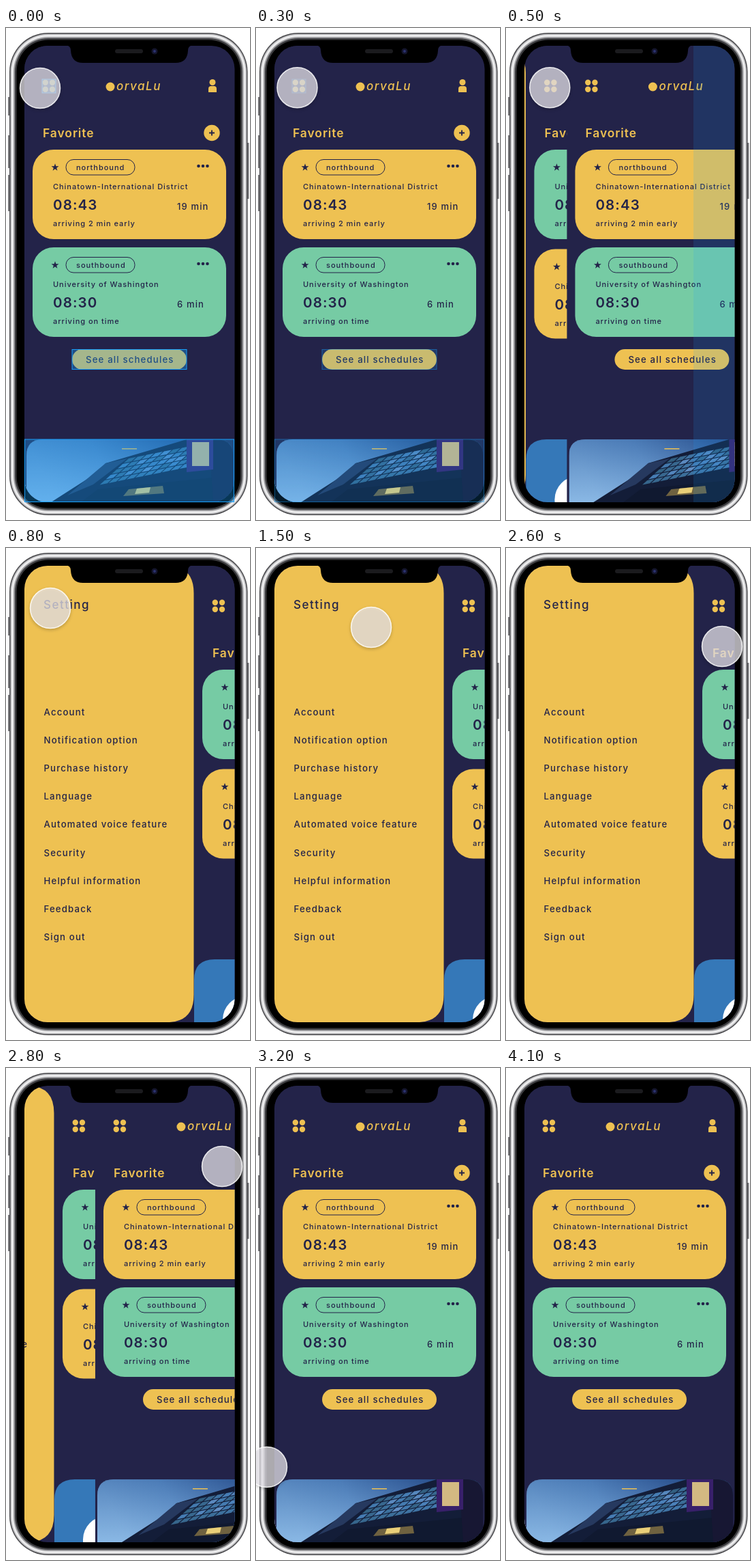
An HTML page that plays this animation: 358 by 720 pixels, repeating every 4.2 s.

```html
<!DOCTYPE html>
<html lang="en">
<head>
<meta charset="utf-8">
<style>
  html, body { margin: 0; width: 100%; height: 100%; overflow: hidden; background: #fff; }
  svg { display: block; width: 358px; height: 720px; }
  text { font-family: Inter, "Open Sans", sans-serif; font-weight: 500; letter-spacing: .088em; fill: #232349; }
  .gold { fill: #eec152; }
  .bold { font-weight: 600; letter-spacing: .055em; }
  .navy { fill: #232349; }
  .hint { fill: #18a0fb; fill-opacity: .34; stroke: #18a0fb; }
  #cursor { filter: drop-shadow(0 2px 2px rgba(0, 0, 0, .25)); }
</style>
</head>
<body>
<svg viewBox="0 0 358 720">
  <defs>
    <linearGradient id="sky" x2="1" y2="-.15">
      <stop offset="0" stop-color="#78aadd"/><stop offset=".3" stop-color="#6497d0"/><stop offset=".75" stop-color="#2c4f8c"/>
    </linearGradient>
    <linearGradient id="dusk" x2="0" y2="1">
      <stop offset="0" stop-color="#24508f" stop-opacity=".4"/><stop offset="1" stop-color="#a5cdf0" stop-opacity=".4"/>
    </linearGradient>
    <clipPath id="screen"><rect x="27" y="26" width="308.5" height="668" rx="34"/></clipPath>
    <clipPath id="photo"><path d="M30 694V626Q30 602 54 602H309Q333 602 333 626V694Z"/></clipPath>
  </defs>

  <path d="M4.500 101V128M4.500 157V205M4.500 215V268M355 168V250" stroke="#77777a" stroke-width="3"/>
  <g id="phone"></g>
  <g clip-path="url(#screen)">
    <g id="settings"></g>
    <g id="home"></g>
  </g>
  <path d="M88 25H274Q267 26 267 33Q266 51 249 51H113Q96 51 95 33Q95 26 88 25Z"/>
  <rect x="160" y="31" width="41" height="6" rx="3" fill="#1b1b1e"/>
  <circle cx="218" cy="34" r="4.500" fill="#14152c"/>
  <circle cx="218" cy="34" r="2" fill="#2b3270"/>
  <g id="hints">
    <rect class="hint" x="53" y="75" width="20" height="20"/>
    <rect class="hint" x="97" y="470.500" width="168" height="29"/>
    <rect class="hint" x="27.500" y="602" width="307" height="91.500"/>
  </g>
  <rect id="closeHint" class="hint" x="275" y="26" width="60" height="668" stroke-width="0" clip-path="url(#screen)"/>
  <circle id="cursor" r="29.500" fill="#eceaf0" fill-opacity=".73" stroke="#fff" stroke-opacity=".85" stroke-width="1.500"/>
</svg>

<script>
const el = id => document.getElementById(id);
const label = (x, y, size, str, cls = '') =>
  `<text x="${x}" y="${y}" font-size="${size}" class="${cls}">${str}</text>`;
const dots = (points, r, cls) =>
  points.map(([x, y]) => `<circle cx="${x}" cy="${y}" r="${r}" class="${cls}"/>`).join('');

// Metal rim, from the outside in
const rim = [[0, '#4a4a4d'], [1.5, '#b9b9bc'], [3, '#ededee'], [6, '#99999c'], [8, '#3c3c3f'], [10.5, '#000']];
el('phone').innerHTML = rim.map(([d, fill]) =>
  `<rect x="${5 + d}" y="${7 + d}" width="${349.5 - 2 * d}" height="${706 - 2 * d}" rx="${57 - d}" fill="${fill}"/>`).join('');

const star = Array.from({ length: 10 }, (_, i) => {
  const r = i % 2 ? 2.3 : 5.8, a = i * Math.PI / 5;
  return `${72 + r * Math.sin(a)},${204 - r * Math.cos(a)}`;
}).join(' ');

const north = { fill: '#eec152', way: 'northbound', stop: 'Chinatown-International District',
  time: '08:43', wait: '19 min', note: 'arriving 2 min early' };
const south = { fill: '#76cba4', way: 'southbound', stop: 'University of Washington',
  time: '08:30', wait: '6 min', note: 'arriving on time' };

const card = (c, dy) => `<g transform="translate(0 ${dy})">
  <rect x="39" y="178" width="284" height="131" rx="31" fill="${c.fill}"/>
  <polygon points="${star}" class="navy"/>
  <rect x="88" y="192.500" width="101" height="22.500" rx="11" fill="none" stroke="#232349"/>
  ${dots([[282.5, 202], [289, 202], [295.5, 202]], 2.3, 'navy')}
  ${label(103, 208, 11, c.way)}${label(69, 236, 11, c.stop)}
  ${label(69, 266, 20.5, c.time, 'bold')}${label(251, 265.5, 13, c.wait)}
  ${label(69, 290, 11, c.note)}</g>`;

const header = `<rect x="27" y="26" width="309" height="668" class="navy"/>
  ${dots([[57.8, 79.7], [68, 79.7], [57.8, 89.7], [68, 89.7]], 4.2, 'gold')}
  ${label(54, 160, 17.4, 'Favorite', 'gold bold')}`;

// Lit office windows on a skewed grid
function windows() {
  let out = '';
  for (let row = 0; row < 5; row++)
    for (let col = 0; col < 13; col++) {
      const tone = (row * 37 + col * 53 + row * col * 11) % 24;
      out += `<rect x="${col * 13}" y="${row * 8}" width="11" height="6.5" fill="hsl(${205 + tone / 3} 44% ${34 + tone}%)"/>`;
    }
  return `<g transform="matrix(1 -.2 -1.1 1 180 630)">${out}</g>`;
}

const photo = `<g clip-path="url(#photo)">
  <rect x="30" y="602" width="303" height="92" fill="url(#sky)"/>
  <rect x="30" y="602" width="303" height="92" fill="url(#dusk)"/>
  <path d="M66 694L138 648L146 637L265 602H333V694Z" fill="#131d38"/>
  <path d="M146 637L178 630L128 668L90 684Z" fill="#26395f"/>
  ${windows()}
  <path d="M110 694L135 675L333 655V694Z" fill="#101930"/>
  <path d="M180 675L230 670L232 681L172 685Z" fill="#6f6240"/>
  <path d="M192 674L212 672L210 680L189 682Z" fill="#e9cf78"/>
  <path d="M298 602H333V694H304Z" fill="#171733"/>
  <path d="M265 602H304V646L265 650Z" fill="#38206a"/>
  <rect x="273" y="606" width="25" height="35" fill="#d3b982"/>
  <rect x="170" y="615" width="22" height="1.5" class="gold"/></g>`;

el('home').innerHTML = `${header}
  <circle cx="153" cy="86" r="6.5" class="gold"/>
  <g font-style="italic">${label(162, 91, 17, 'orvaLu', 'gold')}</g>
  <circle cx="303" cy="79.500" r="4.500" class="gold"/>
  <path d="M297 94V89Q297 85 301 85H305Q309 85 309 89V94Z" class="gold"/>
  <circle cx="302" cy="153.500" r="11.700" class="gold"/>
  <path d="M298 153.500H306M302 149.500V157.500" stroke="#232349" stroke-width="1.800"/>
  ${card(north, 0)}${card(south, 143)}
  <rect x="97" y="470" width="168" height="30" rx="15" class="gold"/>
  ${label(117, 490, 13.2, 'See all schedules')}${photo}`;

const menu = ['Account', 'Notification option', 'Purchase history', 'Language', 'Automated voice feature',
  'Security', 'Helpful information', 'Feedback', 'Sign out'];

el('settings').innerHTML = `<rect x="27" y="26" width="309" height="668" class="navy"/>
  <g transform="translate(249 0)">${header}${card(south, 0)}${card(north, 145.5)}
    <path d="M27 694V632Q27 602 57 602H335V694Z" fill="#3578b8"/>
    <circle cx="103" cy="690" r="34" fill="#fff"/></g>
  <path d="M27 26H240Q275.500 28 275.500 66V654Q275.500 692 240 694H27Z" class="gold"/>
  ${label(55, 89, 17, 'Setting')}
  ${menu.map((item, i) => label(55.5, 245 + i * 41.1, 13.2, item)).join('')}`;

const LOOP = 4200, STEP = 100, SLIDE = 300, WIDTH = 309, OPEN = 468, CLOSE = 2674;
const clamp = v => Math.min(1, Math.max(0, v));
const easeOut = u => 1 - (1 - u) ** 2;
const slide = (t, start) => easeOut(clamp((t - start) / SLIDE));

// time, x, y
const path = [
  [0, 50, 88], [400, 64, 87], [1200, 66, 89], [1500, 169, 116], [1900, 196, 128], [2200, 230, 139],
  [2400, 304, 143], [2500, 317, 144], [2850, 317, 144], [3200, 16, 584], [3300, -60, 660], [4200, -60, 660]
];

function cursorAt(t) {
  const i = path.findIndex(p => p[0] > t);
  const [t0, x0, y0] = path[i - 1], [t1, x1, y1] = path[i];
  const u = (t - t0) / (t1 - t0);
  return [x0 + (x1 - x0) * u, y0 + (y1 - y0) * u];
}

function draw(now) {
  const t = Math.floor(now % LOOP / STEP) * STEP;
  const dx = WIDTH * (slide(t, OPEN) - slide(t, CLOSE));
  el('home').setAttribute('transform', `translate(${dx} 0)`);
  el('settings').setAttribute('transform', `translate(${dx - WIDTH} 0)`);
  el('hints').setAttribute('opacity', clamp((400 - t) / 200));
  el('closeHint').setAttribute('opacity', t < OPEN ? 0 : clamp((700 - t) / 500));
  el('cursor').setAttribute('transform', `translate(${cursorAt(t)})`);
}

const start = performance.now();
function tick() {
  draw(performance.now() - start);
  requestAnimationFrame(tick);
}
tick();
</script>
</body>
</html>
```
